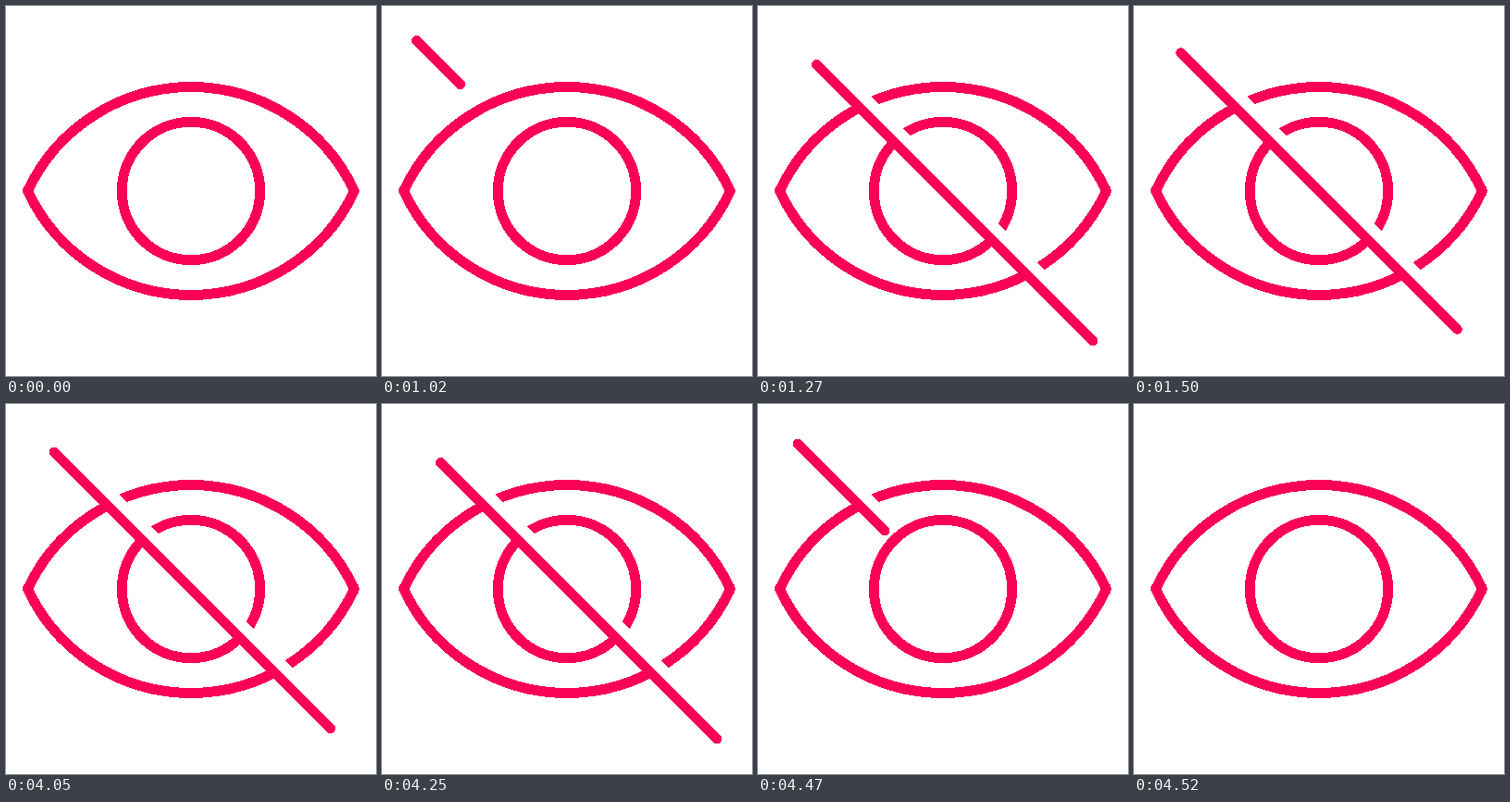
Write an HTML page that moves like this. It is 400x400 px and loops after 4.55 s.

```html
<!DOCTYPE html>
<html lang="en">
<head>
<meta charset="utf-8">
<title>Eye toggle</title>
<style>
  html, body { margin: 0; width: 100%; height: 100%; overflow: hidden; background: #fff; }
  svg { display: block; width: 100%; height: 100%; }
  .ink { fill: none; stroke: #fa0057; stroke-width: 11; stroke-linejoin: round; stroke-linecap: round; }
  .gap { stroke: #fff; stroke-width: 13; stroke-linecap: square; }
</style>
</head>
<body>
<svg viewBox="0 0 400 400" shape-rendering="crispEdges">
  <path class="ink" d="M23.4 200A194.9 194.9 0 0 1 376.6 200A194.9 194.9 0 0 1 23.4 200Z"/>
  <circle class="ink" cx="200" cy="200" r="74.7"/>
  <g id="slash">
    <line class="gap" transform="translate(7.8 -7.8)"/>
    <line class="ink"/>
  </g>
</svg>
<script>
const LOOP = 4550;
const SHOW_AT = 1000, HIDE_END = 4525, DURATION = 500;
const LINE_START = 50.7, LINE_LENGTH = 298.6;
const DRAW_TIME = 158.8, PEAK_TIME = 170, SWING = 18.7;

const slash = document.getElementById('slash');
const lines = slash.querySelectorAll('line');
const clamp = (v, lo, hi) => Math.min(hi, Math.max(lo, v));

// 40 pictures per second, with change times cut down to whole hundredths
const snap = t => 50 * Math.floor(t / 50) + (t % 50 >= 20 ? 25 : 0);

// Slide along the diagonal: rush past the resting place, then settle back
const slide = t => t < PEAK_TIME
  ? SWING * (2 * t / PEAK_TIME - 1)
  : SWING * (DURATION - t) / (DURATION - PEAK_TIME);

function draw(now) {
  const t = snap(now % LOOP);
  // Hiding is the same motion played backwards
  const age = clamp(Math.min(t - SHOW_AT, HIDE_END - t), 0, DURATION);
  const from = LINE_START + slide(age);
  const to = from + LINE_LENGTH * Math.min(1, age / DRAW_TIME);

  slash.style.display = age > 0 ? '' : 'none';
  for (const line of lines) {
    for (const axis of ['x', 'y']) {
      line.setAttribute(axis + 1, from);
      line.setAttribute(axis + 2, to);
    }
  }
}

const begin = performance.now();
function tick() {
  draw(performance.now() - begin);
  requestAnimationFrame(tick);
}
tick();
</script>
</body>
</html>
```
